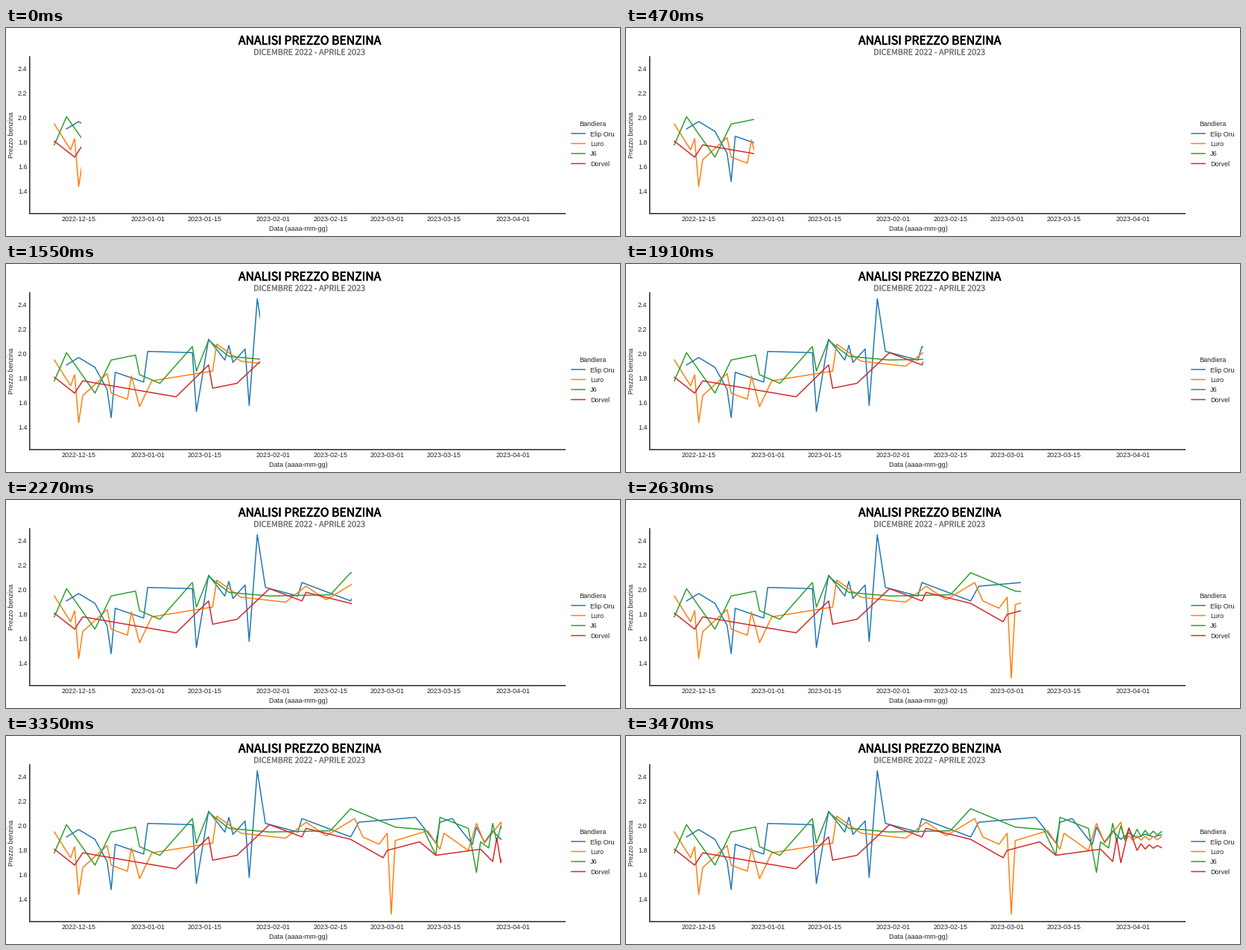
Recreate the animation shown at these times as a matplotlib script. Size 824 by 280 pixels, loop 4.1 s.

```python
import matplotlib.pyplot as plt
import numpy as np
from matplotlib.animation import FuncAnimation
from matplotlib.patheffects import withStroke
from matplotlib.transforms import Bbox

W, H, DPI = 824, 280, 80
PX = 72 / DPI                       # points per pixel
LOOP, TICK = 4100, 20               # ms
FIRST, STEP, LAST = 110, 120, 29    # first wipe step, step length, last step
EDGES = [101, 190, 285, 378, 485, 598, 710]     # wipe edge every 5 steps
INK = "#262626"
LEFT, RIGHT, TOP, BASE = 32, 751, 38, 249.8
START = np.datetime64("2022-12-09")             # day 0
DAY = (RIGHT - LEFT) / 132


def day_x(day):
    return LEFT + 0.2 + (day + 6) * DAY


def price_y(cents):
    return 220 - (cents - 140) * 1.65


def settle(first, step, level, swing, decay):
    """Zigzag around a level that calms down towards day 120."""
    return [(day, level + swing * (-decay) ** k)
            for k, day in enumerate(range(first, 121, step))]


# Turning points as (day, price in cents), then the closing zigzag.
SERIES = [
    ("Elip Oru", "#1f77b4",
     [(3, 191), (6, 197), (10, 189), (13, 171), (14, 148), (15, 185),
      (22, 177), (23, 202), (34, 201), (35, 153), (38, 212), (42, 195),
      (43, 207), (44, 193), (47, 204), (48, 158), (50, 245), (52, 202),
      (60, 195), (61, 206), (73, 191), (75, 203), (89, 207), (94, 186),
      (95, 203), (98, 206), (103, 185)]
     + settle(104, 2, 192, 7, 0.75)),
    ("Luro", "#ff7f0e",
     [(0, 195), (4, 174), (5, 183), (6, 144), (7, 166), (13, 184),
      (14, 168), (18, 163), (19, 182), (21, 157), (24, 178), (39, 186),
      (40, 208), (46, 194), (57, 190), (62, 203), (67, 192), (74, 206),
      (76, 191), (80, 185), (82, 194), (83, 128), (84, 188), (92, 196),
      (95, 181), (96, 194), (102, 180), (104, 202), (106, 186), (110, 203)]
     + settle(111, 1, 190, -2, 0.95)),
    ("J6", "#2ca02c",
     [(0, 178), (3, 201), (10, 168), (14, 195), (20, 199), (21, 183),
      (26, 176), (34, 206), (35, 186), (38, 211), (43, 198), (53, 195),
      (68, 196), (73, 214), (84, 199), (91, 197), (94, 176), (95, 207),
      (102, 198), (104, 162), (105, 187), (107, 182)]
     + settle(108, 1, 194, 8, 0.86)),
    ("Dorvel", "#d62728",
     [(0, 181), (5, 168), (7, 178), (30, 165), (38, 191), (39, 172),
      (45, 176), (53, 201), (61, 191), (62, 198), (73, 189), (81, 174),
      (82, 180), (90, 187), (94, 176), (105, 181), (108, 171), (109, 190),
      (110, 170), (112, 198)]
     + settle(114, 1, 183, -3, 0.8)),
]

plt.rcParams["font.family"] = "Liberation Sans"
fig = plt.figure(figsize=(W / DPI, H / DPI), dpi=DPI, facecolor="white")
ax = fig.add_axes([0, 0, 1, 1])
ax.set(xlim=(0, W), ylim=(H, 0))
ax.axis("off")


def label(x, y, text, size=9, color=INK, ha="center", **kw):
    return ax.text(x, y, text, fontsize=size * PX, color=color, ha=ha,
                   va="baseline", **kw)


def heading(x, y, text, size, color, weight):
    text = label(x, y, text, size, color,
                 family=["Noto Sans CJK JP", "Liberation Sans"])
    text.set_path_effects([withStroke(linewidth=weight * PX,
                                      foreground=color)])


def stroke(x, y, color, width=1.5, **kw):
    return ax.plot(x, y, color=color, lw=width * PX, **kw)[0]


heading(407.7, 22.2, "ANALISI PREZZO BENZINA", 15.8, "black", 0.7)
heading(407.3, 36.2, "DICEMBRE 2022 - APRILE 2023", 10.8, "#757575", 0.2)

stroke([LEFT - 0.2, LEFT - 0.2, RIGHT], [TOP, BASE, BASE], INK, snap=False,
       solid_joinstyle="miter", solid_capstyle="butt")
for month in ("2022-12", "2023-01", "2023-02", "2023-03", "2023-04"):
    for day in ("01", "15"):
        date = f"{month}-{day}"
        x = day_x((np.datetime64(date) - START).astype(int))
        if day_x(0) < x < day_x(120):
            label(x, 260, date)
for cents in range(140, 241, 20):
    label(28.5, price_y(cents) + 3.2, f"{cents / 100:.1f}", ha="right")
label(392, 272.6, "Data (aaaa-mm-gg)")
label(10.4, 144, "Prezzo benzina", rotation=90, rotation_mode="anchor")

label(787, 132.4, "Bandiera")
lines = []
for i, (name, color, points) in enumerate(SERIES):
    y = 142 + 13.5 * i
    stroke([759, 777], [y, y], color, snap=False)
    label(784, y + 3.5, name, ha="left")
    days, prices = np.array(points).T
    lines.append(stroke(day_x(days), price_y(prices), color))


def update(frame):
    t = (frame + 0.5) * TICK
    step = max(0, (t - FIRST + TICK / 2) // STEP + 1)
    edge = np.interp(step, np.arange(len(EDGES)) * 5, EDGES)
    if step >= LAST:
        edge = RIGHT
    for line in lines:
        line.set_clip_box(Bbox.from_extents(0, 0, edge, H))
    return lines


anim = FuncAnimation(fig, update, frames=LOOP // TICK, interval=TICK,
                     repeat=True, repeat_delay=0, blit=False)
plt.show()
```
